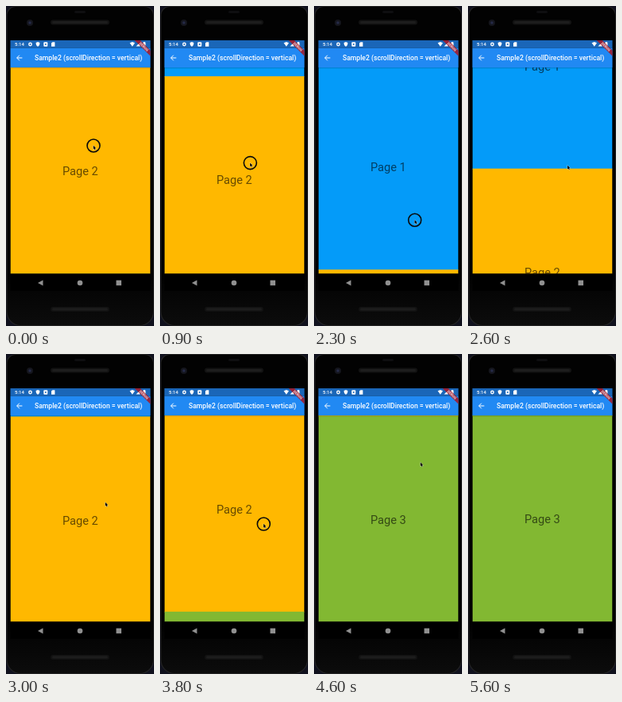
An HTML page with a canvas for the animation above (5.7 s loop, 186 px wide and 401 px high).

```html
<!DOCTYPE html>
<html lang="en">
<head>
<meta charset="utf-8">
<title>Vertical pager</title>
<style>
html, body { margin: 0; width: 186px; height: 401px; overflow: hidden; background: #000; }
canvas { display: block; width: 186px; height: 401px; }
</style>
</head>
<body>
<canvas id="stage"></canvas>
<script>
const W = 186, H = 401, LOOP = 5700, STEP = 100;
const SCREEN = { x: 5.5, y: 43, w: 176, bottom: 335.5 };
const VIEW_TOP = 77, VIEW_H = SCREEN.bottom - VIEW_TOP;
const PAGES = ['#049bf9', '#ffb800', '#82b832'];
const FONT = 'Roboto, "Noto Sans", sans-serif';
const WHITE = '#fff', GREY = '#909090';

// Each swipe turns by one page along an S curve; the pointer is down from press to release.
const SWIPES = [
  { turn: -1, mid: 1196, rate: .0105, press: 0, release: 1200 },
  { turn: 1, mid: 2597, rate: .0131, press: 2000, release: 2600 },
  { turn: 1, mid: 4058, rate: .0115, press: 3500, release: 4000 }
];
const FIRST_PAGE = 1;

// Pointer glides: each one eases to its end point.
const HOME = { x: 110, y: 175 };
const GLIDES = [
  { from: 700, to: 1400, x: 127, y: 284 },
  { from: 2150, to: 2740, x: 125, y: 186 },
  { from: 3000, to: 3500, x: 129, y: 240 },
  { from: 3650, to: 4100, x: 134, y: 136 },
  { from: 4700, to: 5200, x: 195, y: 110 }
];

const canvas = document.getElementById('stage');
const ctx = canvas.getContext('2d');
const ratio = window.devicePixelRatio || 1;
canvas.width = W * ratio;
canvas.height = H * ratio;

function smooth(a, b, t) {
  const k = Math.min(1, Math.max(0, (t - a) / (b - a)));
  return k * k * (3 - 2 * k);
}

function scrollAt(t) {
  return SWIPES.reduce((pos, s) => pos + s.turn / (1 + Math.exp(-s.rate * (t - s.mid))), FIRST_PAGE);
}

function pointerAt(t) {
  return GLIDES.reduce((p, g) => {
    const k = smooth(g.from, g.to, t);
    return { x: p.x + (g.x - p.x) * k, y: p.y + (g.y - p.y) * k };
  }, HOME);
}

function rect(x, y, w, h, color) {
  ctx.fillStyle = color;
  ctx.fillRect(x, y, w, h);
}

function round(x, y, w, h, r, color) {
  ctx.fillStyle = color;
  ctx.beginPath();
  ctx.roundRect(x, y, w, h, r);
  ctx.fill();
}

function disc(x, y, r, color) {
  ctx.fillStyle = color;
  ctx.beginPath();
  ctx.arc(x, y, r, 0, Math.PI * 2);
  ctx.fill();
}

function ring(x, y, r, width, color) {
  ctx.strokeStyle = color;
  ctx.lineWidth = width;
  ctx.beginPath();
  ctx.arc(x, y, r, 0, Math.PI * 2);
  ctx.stroke();
}

function poly(points, color) {
  ctx.fillStyle = color;
  ctx.beginPath();
  points.forEach(([x, y]) => ctx.lineTo(x, y));
  ctx.closePath();
  ctx.fill();
}

function fade(y0, y1, c0, c1) {
  const g = ctx.createLinearGradient(0, y0, 0, y1);
  g.addColorStop(0, c0);
  g.addColorStop(1, c1);
  return g;
}

function text(str, x, y, size, weight, color, align = 'left') {
  ctx.font = `${weight} ${size}px ${FONT}`;
  ctx.textAlign = align;
  ctx.fillStyle = color;
  ctx.fillText(str, x, y);
}

function drawSpeaker(y) {
  round(56, y, 74, 6, 3, '#121212');
  round(58, y + 1.5, 70, 3, 1.5, '#1d1d1d');
}

function drawPhone() {
  rect(0, 0, W, H, '#10111d');
  round(0.5, 0, 185.5, 401, [12, 12, 18, 18], '#242424');
  round(1.5, 1, 183.5, 399, [11, 11, 17, 17], fade(340, H, '#020202', '#0c0c0c'));
  round(86, 6, 14, 3, 1.5, '#0e0e10');
  drawSpeaker(17.5);
  drawSpeaker(377);
  disc(30, 21, 4, '#15161d');
  disc(30, 21, 1.8, '#252a48');
}

function drawPages(pos) {
  ctx.save();
  ctx.beginPath();
  ctx.rect(SCREEN.x, VIEW_TOP, SCREEN.w, VIEW_H);
  ctx.clip();
  PAGES.forEach((color, i) => {
    const y = VIEW_TOP + (i - pos) * VIEW_H;
    rect(SCREEN.x, y, SCREEN.w, VIEW_H + 1, color);
    text(`Page ${i + 1}`, 93.3, y + 135.3, 14.6, 400, 'rgba(0,0,0,.6)', 'center');
  });
  rect(SCREEN.x, VIEW_TOP, SCREEN.w, 2, fade(VIEW_TOP, VIEW_TOP + 2, 'rgba(0,0,0,.2)', 'rgba(0,0,0,0)'));
  ctx.restore();
}

function drawStatusIcons() {
  ring(30.5, 48, 1.7, 1.4, WHITE);
  poly([[37.5, 46], [40, 45], [42.5, 46], [42, 49], [40, 51], [38, 49]], WHITE);
  round(47.3, 45.3, 5, 5.4, 1, WHITE);
  disc(49.8, 48, 1, '#1a66b8');
  poly([[57, 46.6], [58.4, 45.2], [61.4, 45.2], [61.4, 50.8], [57, 50.8]], WHITE);
  poly([[155.5, 46.2], [158.8, 45], [162, 46.2], [158.8, 50.8]], WHITE);
  poly([[163.5, 50.6], [168.5, 50.6], [168.5, 45.4]], WHITE);
  rect(172.2, 45.6, 3.2, 5.2, WHITE);
  rect(173, 45, 1.6, 1, WHITE);
}

function drawBanner() {
  ctx.save();
  ctx.beginPath();
  ctx.rect(SCREEN.x, SCREEN.y, SCREEN.w, 40);
  ctx.clip();
  ctx.translate(SCREEN.x + SCREEN.w, SCREEN.y);
  ctx.rotate(Math.PI / 4);
  rect(-20, 9, 40, 5, 'rgba(165,25,40,.88)');
  text('DEBUG', 0, 13.1, 4.4, 900, '#ecd3da', 'center');
  ctx.restore();
}

function drawAppBar() {
  rect(SCREEN.x, SCREEN.y, SCREEN.w, 9.5, '#1a66b8');
  rect(SCREEN.x, 52.5, SCREEN.w, VIEW_TOP - 52.5, '#2189f3');
  text('5:14', 11, 50.2, 6, 500, WHITE);
  drawStatusIcons();
  ctx.strokeStyle = WHITE;
  ctx.lineWidth = 1;
  ctx.beginPath();
  ctx.moveTo(20.4, 65);
  ctx.lineTo(13.8, 65);
  ctx.moveTo(16.9, 61.7);
  ctx.lineTo(13.6, 65);
  ctx.lineTo(16.9, 68.3);
  ctx.stroke();
  text('Sample2 (scrollDirection = vertical)', 36, 68, 8.6, 500, WHITE);
  drawBanner();
}

function drawNavBar() {
  rect(SCREEN.x, SCREEN.bottom, SCREEN.w, 21.5, '#000');
  poly([[40, 347], [46.5, 343.4], [46.5, 350.6]], GREY);
  disc(93, 347, 3.3, GREY);
  rect(138.5, 343.7, 6.5, 6.5, GREY);
}

function drawPointer({ x, y }, pressed) {
  if (pressed) ring(x, y, 8, 1.6, '#0a0a0a');
  ctx.save();
  ctx.translate(x - 0.2, y - 0.2);
  ctx.beginPath();
  [[0, 0], [0, 4.8], [1.1, 3.9], [1.9, 5.6], [2.7, 5.2], [1.9, 3.6], [3.4, 3.5]]
    .forEach(([px, py]) => ctx.lineTo(px, py));
  ctx.closePath();
  ctx.lineJoin = 'round';
  ctx.lineWidth = 0.8;
  ctx.strokeStyle = 'rgba(255,255,255,.7)';
  ctx.stroke();
  ctx.fillStyle = '#000';
  ctx.fill();
  ctx.restore();
}

function draw(t) {
  ctx.setTransform(ratio, 0, 0, ratio, 0, 0);
  drawPhone();
  drawPages(scrollAt(t));
  drawAppBar();
  drawNavBar();
  drawPointer(pointerAt(t), SWIPES.some(s => t >= s.press && t < s.release));
}

const start = performance.now();
function tick() {
  const t = (performance.now() - start) % LOOP;
  draw(Math.floor(t / STEP) * STEP);
  requestAnimationFrame(tick);
}
tick();
</script>
</body>
</html>
```
